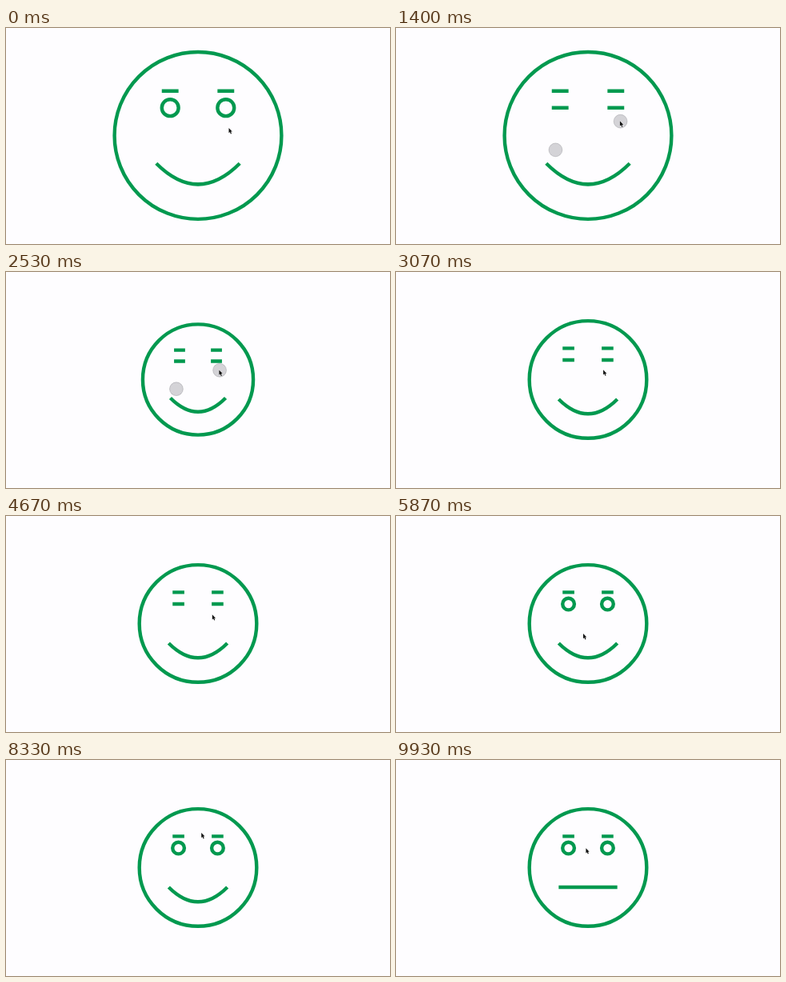
Animation of 480x270 px, one loop 9990 ms. Source, as an HTML page:

```html
<!DOCTYPE html>
<html lang="en">
<head>
<meta charset="utf-8">
<title>Face</title>
<style>
  html, body { margin: 0; width: 100%; height: 100%; overflow: hidden; background: #fefdff; }
  svg { display: block; width: 100%; height: 100%; }
  .face { fill: none; stroke: #02994f; stroke-width: 4.4; }
  .touch { fill: rgba(115, 115, 122, .3); stroke: rgba(100, 100, 105, .35); stroke-width: .8; }
  .cursor { fill: #111; stroke: #fff; stroke-width: .6; paint-order: stroke; }
</style>
</head>
<body>
<svg viewBox="0 0 480 270">
  <path class="face" id="face"/>
  <g id="touches">
    <circle class="touch" r="8.4"/>
    <circle class="touch" r="8.4"/>
  </g>
  <path class="cursor" id="cursor" d="M0 0V6.2L1.4 5L2.4 7.4L3.5 6.9L2.5 4.6H4.3Z"/>
</svg>
<script>
const LOOP = 9990, CX = 240, CY = 134.5;
const $ = id => document.getElementById(id);
const face = $('face'), touches = $('touches'), cursor = $('cursor');

const mix = (a, b, p) => a + (b - a) * p;
const progress = (t, from, to) => Math.min(1, Math.max(0, (t - from) / (to - from)));
const smooth = p => p * p * (3 - 2 * p);
const easeOut = p => 1 - (1 - p) ** 3;

// Pinch in, then back out part of the way
function radius(t) {
  const small = 49.6;
  return t < 2220
    ? mix(104.4, small, smooth(progress(t, 1530, 2220)))
    : mix(small, 73.3, easeOut(progress(t, 2220, 2930)));
}

// While pinching, the finger keeps its place relative to the face
const grip = t => [CX + .382 * radius(t), CY - .174 * radius(t)];

const taps = [870, 3400, 3670, 4070, 4400, 5600, 6070, 6930];
const swipes = [], moves = [];
const move = (from, to, x, y) => moves.push({ from, to, target: () => [x, y] });
function swipe(from, y) {
  move(from, from + 330, 238, y);
  swipes.push(from + 200);
}

move(200, 730, 249, 134.5);
moves.push({ from: 1200, to: 1400, target: grip });
move(3000, 3130, 252, 122.8);
move(4600, 4670, 257.8, 123.2);
move(4670, 5330, 245, 143.5);
move(5730, 5870, 234, 147);
move(6000, 6200, 234, 99);
move(6400, 6670, 237.4, 116.5);
move(6870, 7270, 236, 158);
move(7270, 7870, 244.2, 91);
move(8330, 8470, 241, 100);
swipe(8600, 181.5);
move(9000, 9270, 238, 125);
swipe(9270, 194.5);
move(9730, 9930, 237.4, 110.2);

function pointer(t) {
  let pos = [278.5, 125];
  for (const { from, to, target } of moves) {
    if (t < from) break;
    const end = target(t), p = smooth(progress(t, from, to));
    pos = pos.map((v, i) => mix(v, end[i], p));
  }
  return pos;
}

const count = (times, t) => times.filter(at => t >= at).length;

const ring = (x, y, r) =>
  `M${x - r} ${y}a${r} ${r} 0 1 1 ${2 * r} 0a${r} ${r} 0 1 1 ${-2 * r} 0Z`;
const bar = (x, y, r) => `M${x - r} ${y}h${2 * r}`;

function facePath(r, open, smile) {
  const third = r / 3, eye = r / 10, dip = smile * third;
  let d = ring(CX, CY, r);
  for (const side of [-1, 1]) {
    const x = CX + side * third, y = CY - third;
    d += (open ? ring : bar)(x, y, eye) + bar(x, y - r / 5, eye);
  }
  return d + `M${CX - r / 2} ${CY + third}c${third} ${dip} ${2 * third} ${dip} ${r} 0`;
}

function draw(ms) {
  // Step at 15 pictures a second, rounded to 10 ms
  const t = Math.round(Math.floor(ms * .015 + .08) * 20 / 3) * 10;
  const [x, y] = pointer(t);
  face.setAttribute('d', facePath(radius(t), count(taps, t) % 2 === 0, 1 - count(swipes, t) / 2));
  cursor.setAttribute('transform', `translate(${x} ${y})`);
  touches.style.display = t >= 1270 && t < 2930 ? '' : 'none';
  [1, -1].forEach((side, i) => {
    const dot = touches.children[i];
    dot.setAttribute('cx', CX + side * (x + .7 - CX));
    dot.setAttribute('cy', CY + side * (y + .3 - CY));
  });
}

const start = performance.now();
function tick() {
  draw((performance.now() - start) % LOOP);
  requestAnimationFrame(tick);
}
tick();
</script>
</body>
</html>
```
